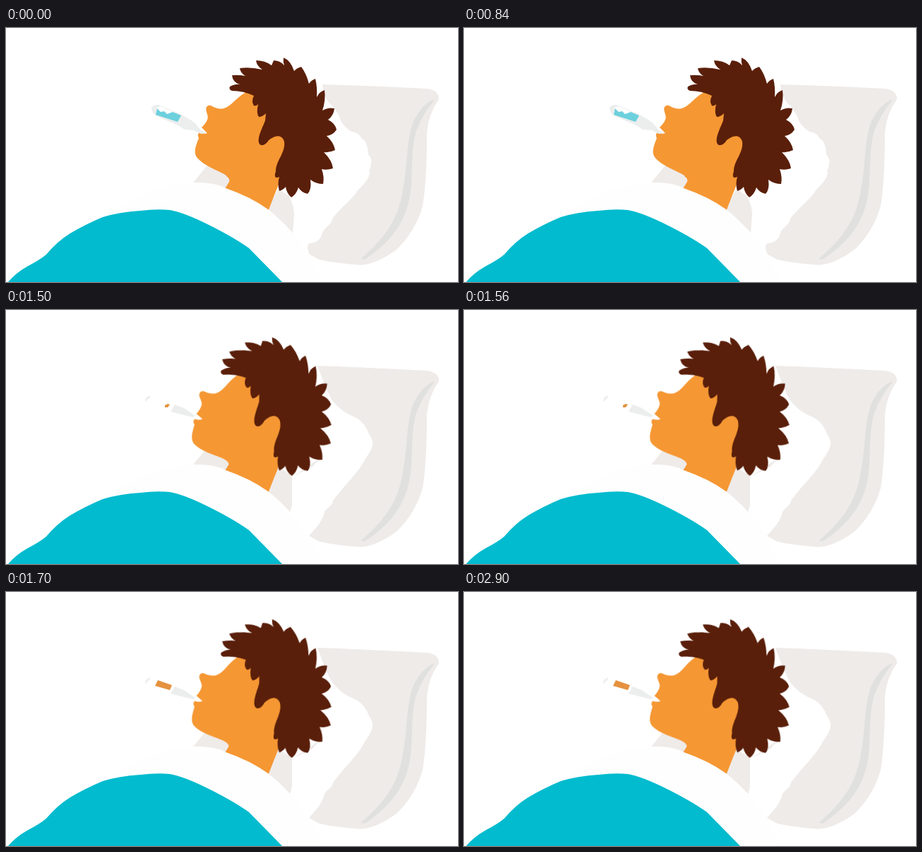
Recreate the animation shown at these times as an HTML page. Size 640 by 360 pixels, loop 3700 ms.

```html
<!DOCTYPE html>
<html lang="en">
<head>
<meta charset="utf-8">
<title>Taking a temperature in bed</title>
<style>
html, body { margin: 0; width: 100%; height: 100%; overflow: hidden; background: #fff; }
svg { display: block; width: 100%; height: 100%; }
.skin { fill: #f59733; }
.hair { fill: #5a1f0a; }
.linen { fill: #efebe9; }
.fold { fill: #e0e1df; }
.sheet { fill: #fefefe; }
.cover { fill: #02bbce; }
.glass { fill: #eceeee; }
.warm { fill: #e5923f; }

/* 3.7 s loop: rest, tilt, then the reading grows in hard steps */
.rest, .tilted, .w1, .w2, .w3, .w4, .head { animation: 3.7s step-end infinite; }
.tilted, .w1, .w2, .w3, .w4 { visibility: hidden; }
.rest { animation-name: rest; }
.tilted { animation-name: tilted; }
.w1 { animation-name: w1; }
.w2 { animation-name: w2; }
.w3 { animation-name: w3; }
.w4 { animation-name: w4; }
.head { transform-origin: 346px 230px; animation-name: tilt; }
@keyframes rest { 0% { visibility: visible } 37.8378%, 100% { visibility: hidden } }
@keyframes tilted { 0% { visibility: hidden } 37.8378%, 100% { visibility: visible } }
@keyframes w1 { 0% { visibility: hidden } 37.8378% { visibility: visible } 40.5405%, 100% { visibility: hidden } }
@keyframes w2 { 0% { visibility: hidden } 40.5405% { visibility: visible } 43.2432%, 100% { visibility: hidden } }
@keyframes w3 { 0% { visibility: hidden } 43.2432% { visibility: visible } 45.9459%, 100% { visibility: hidden } }
@keyframes w4 { 0% { visibility: hidden } 45.9459%, 100% { visibility: visible } }
@keyframes tilt { 0% { transform: none } 37.8378%, 100% { transform: rotate(-4.9deg) } }
</style>
</head>
<body>
<svg viewBox="0 0 640 360">
  <!-- pillow -->
  <path class="linen rest" d="M448 80Q520 82 596 86Q613 88 613 101Q598 122 596 148Q596 215 590 252Q580 288 553 314Q526 334 503 336Q464 333 443 328L430 321Q424 309 430 305Q442 305 447 294C449 282 462 279 462 270C474 254 492 242 498 230Q518 211 514 203Q521 186 513 180Q512 160 504 157Q500 148 489 147Q473 136 472 125L463 111Q451 104 448 80Z"/>
  <path class="linen tilted" d="M441 79Q520 82 596 86Q613 88 613 101Q598 122 596 148Q596 215 590 252Q580 288 553 314Q526 334 503 336Q464 333 443 328L429 320C438 309 445 304 450 290C451 280 462 280 463 270C480 247 499 231 508 212C521 194 522 187 514 176Q508 158 492 151C475 144 467 134 461 127Q452 110 441 79Z"/>
  <path class="fold" d="M606 101Q588 109 577 132C566 160 569 195 562 228C557 264 542 294 502 327L508 328C549 301 566 272 572 238C577 210 572 177 581 146Q590 122 606 103Z"/>
  <path class="linen" d="M262 223L288 191L325 205L314 232Z"/>
  <path class="linen rest" d="M366 262L386 228L400 238Q407 248 408 263L406 291L395 286Z"/>
  <path class="linen tilted" d="M366 262L385 222L405 235L405 276L402 287L393 280ZM408 235L447 208L434 222Z"/>

  <!-- neck and head -->
  <path class="skin" d="M308 231L316 218Q318 214 312 210L340 170L387 200L386 222Q379 239 371 260Z"/>
  <g class="head">
    <path class="skin" d="M345 88Q333 94 323 104C309 118 302 115 294 112Q287 107 284 112C281 117 288 124 285 130Q283 135 277 141Q281 145 285 149Q280 151 274 148Q270 151 273 156C269 166 265 176 270 183C281 197 303 202 313 210Q320 216 314 223L384 224L405 150Z"/>
    <path class="hair" d="M317 83Q325 79 331 80Q321 77 320 67Q330 66 339 68Q332 64 331 57Q346 55 363 59Q355 54 354 46Q367 46 376 53L379 46Q388 46 394 53Q392 48 393 42Q403 46 408 61Q411 57 418 55Q425 64 429 79Q432 74 438 72Q441 84 440 98Q444 90 451 88Q453 102 448 117Q456 112 465 114Q464 124 456 130Q466 135 468 144Q463 152 454 153Q464 162 466 173Q458 177 450 176Q462 188 463 199Q454 202 447 200Q451 211 449 221Q439 221 431 215Q433 229 427 235Q418 233 414 226Q411 236 404 240Q397 234 396 225Q393 229 387 231Q384 221 387 211Q378 215 382 203C382 188 396 177 394 161C390 148 378 154 372 159Q367 167 361 166C352 161 364 140 367 131L368 121Q363 126 358 126Q354 121 357 108Q354 111 351 110Q347 104 351 96Q336 89 320 89Q315 87 317 83Z"/>
  </g>

  <!-- thermometer -->
  <g class="rest">
    <path class="glass" d="M206 113Q210 107 219 110L247 122Q258 128 267 134L276 145L285 149L276 150L266 145L253 144L244 138L216 126Q206 122 206 113Z"/>
    <path fill="#fff" d="M213 113L219 111L235 118L238 122L226 122L216 119Z"/>
    <path fill="#6dd0dd" d="M214 114L219 119L224 118L228 122L236 119L248 124L243 133L212 123Z"/>
  </g>
  <g class="tilted">
    <path class="glass" d="M197 128Q198 123 204 121L203 125L199 128L200 131Z"/>
    <path class="glass" d="M239 134L252 139L268 150L265 152L248 148L233 144Z"/>
  </g>
  <path class="warm w1" d="M231 135L237 131L238 136L234 139L230 139Z"/>
  <path class="warm w2" d="M225 135L229 133L232 134L229 138L225 138Z"/>
  <path class="warm w3" d="M222 127L234 131L232 138L218 136Z"/>
  <path class="warm w4" d="M215 125L235 132L232 139L211 133Z"/>

  <!-- bedding -->
  <path class="sheet" d="M120 275Q155 254 192 237Q226 221 265 219Q295 218 311 227Q346 239 371 257Q405 284 427 319L445 350L448 360H120Z"/>
  <path class="cover" d="M3 360Q14 347 30 338Q49 328 57 321Q73 302 91 291Q113 278 137 268Q160 261 190 259Q214 256 232 258Q250 261 281 276Q320 295 344 312L391 360Z"/>
</svg>
</body>
</html>
```
